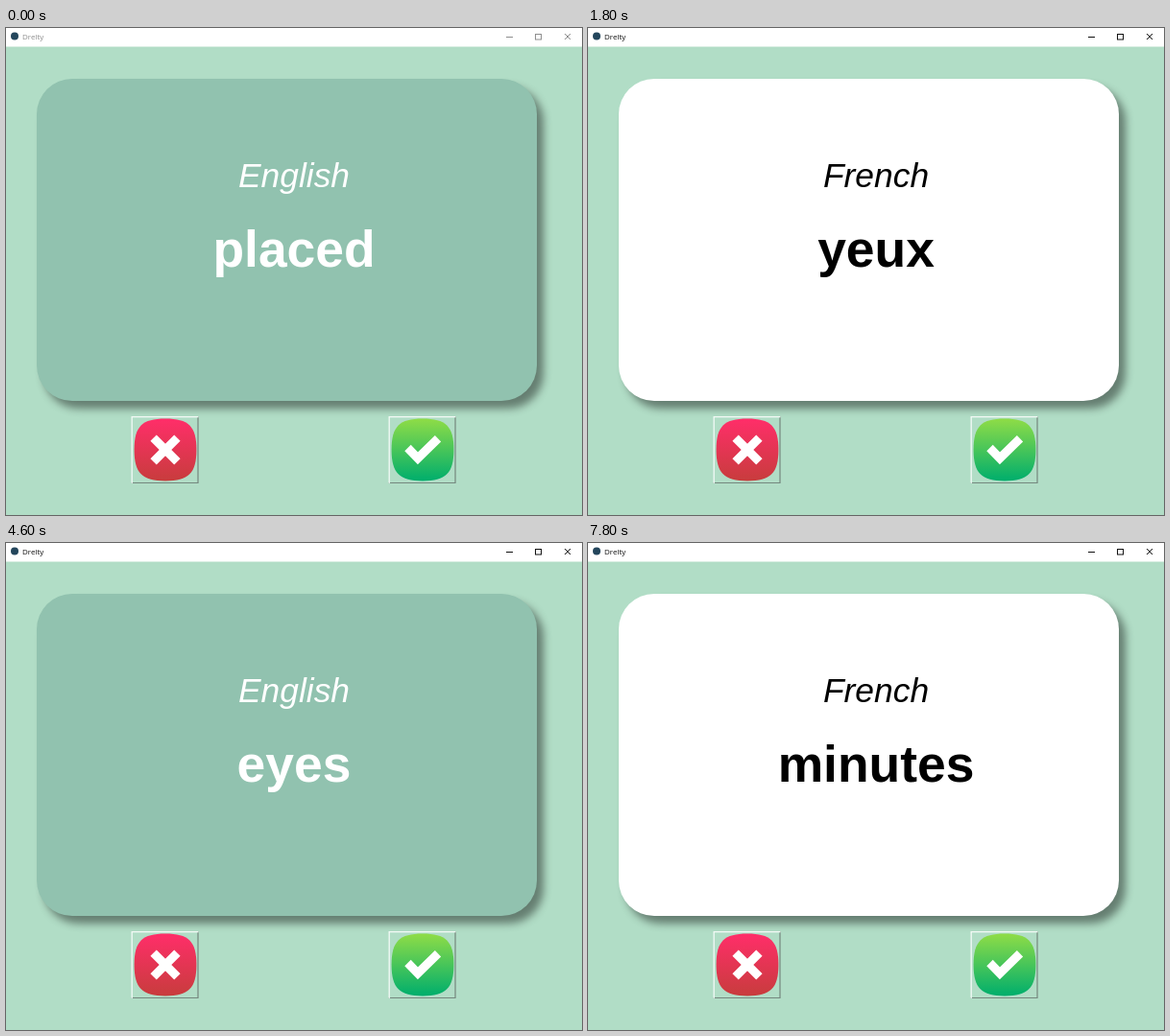
Animation, 600 px wide and 508 px high, one loop 8000 ms. Source, as an HTML page with a canvas:

```html
<!DOCTYPE html>
<html lang="en">
<head>
<meta charset="utf-8">
<title>Drelty</title>
<style>
  html, body { margin: 0; width: 100%; height: 100%; overflow: hidden; background: #b1ddc6; }
  canvas { display: block; }
</style>
</head>
<body>
<canvas id="stage" width="600" height="508"></canvas>
<script>
const ctx = document.getElementById('stage').getContext('2d');
const LOOP = 8000;
const GREEN = '#b1ddc6';

// Each step holds until the next one starts.
const steps = [
  { at: 0,    lang: 'English', word: 'placed' },
  { at: 1400, lang: 'French',  word: 'yeux',    active: true },
  { at: 4600, lang: 'English', word: 'eyes',    active: true },
  { at: 7000, lang: 'English', word: 'eyes',    active: true, pressed: true },
  { at: 7200, lang: 'French',  word: 'minutes', active: true }
];

function line(points, color, width) {
  ctx.beginPath();
  points.forEach(([x, y]) => ctx.lineTo(x, y));
  ctx.strokeStyle = color;
  ctx.lineWidth = width;
  ctx.stroke();
}

function text(str, x, y, font, color, align) {
  ctx.font = font;
  ctx.fillStyle = color;
  ctx.textAlign = align;
  ctx.fillText(str, x, y);
}

function titleBar(active) {
  const ink = active ? '#111' : '#8e8e8e';
  ctx.fillStyle = '#fff';
  ctx.fillRect(0, 0, 600, 19.5);
  ctx.fillStyle = '#24465c';
  ctx.beginPath();
  ctx.arc(9, 8.5, 4, 0, Math.PI * 2);
  ctx.fill();
  text('Drelty', 17, 12, '8px "Open Sans", sans-serif', ink, 'left');
  line([[521, 9.5], [528, 9.5]], ink, 1);
  ctx.strokeRect(551.5, 6.5, 6, 5.5);
  line([[582, 6], [588, 12]], ink, 1);
  line([[588, 6], [582, 12]], ink, 1);
}

function card(step) {
  const french = step.lang === 'French';
  const ink = french ? '#000' : '#fff';
  ctx.save();
  ctx.shadowColor = 'rgba(0, 0, 0, 0.43)';
  ctx.shadowBlur = 9;
  ctx.shadowOffsetX = 7;
  ctx.shadowOffsetY = 8;
  ctx.fillStyle = french ? '#fff' : '#91c2af';
  ctx.beginPath();
  ctx.roundRect(32, 53, 521, 336, 37);
  ctx.fill();
  ctx.restore();
  text(step.lang, 300, 166, 'italic 35.4px "Liberation Sans", Arial, sans-serif', ink, 'center');
  text(step.word, 300, 249, 'bold 53.4px "Liberation Sans", Arial, sans-serif', ink, 'center');
}

function squircle(cx, cy, r) {
  const k = r * 0.75, c = r * 0.94;
  ctx.beginPath();
  ctx.moveTo(cx - r, cy);
  ctx.bezierCurveTo(cx - r, cy - k, cx - k, cy - r, cx, cy - r);
  ctx.bezierCurveTo(cx + k, cy - r, cx + r, cy - k, cx + r, cy);
  ctx.bezierCurveTo(cx + r, cy + k, cx + k, cy + r, cx, cy + r);
  ctx.bezierCurveTo(cx - k, cy + r, cx - r, cy + k, cx - r, cy);
  ctx.fill();
}

function button(x, colors, marks, pressed) {
  const y = 405, w = 70, h = 70;
  const light = '#f3faf6', dark = '#74877e';
  ctx.fillStyle = GREEN;
  ctx.fillRect(x, y, w, h);
  line([[x + w - 0.5, y], [x + w - 0.5, y + h - 0.5], [x, y + h - 0.5]], pressed ? light : dark, 1.2);
  line([[x + 0.7, y + h], [x + 0.7, y + 0.7], [x + w, y + 0.7]], pressed ? dark : light, 1.3);

  ctx.save();
  ctx.translate(x + 35.5 + (pressed ? 1 : 0), y + 35 + (pressed ? 0.7 : 0));
  const fill = ctx.createLinearGradient(0, -32, 0, 32);
  fill.addColorStop(0, colors[0]);
  fill.addColorStop(1, colors[1]);
  ctx.fillStyle = fill;
  squircle(0, 0, 32.4);
  marks.forEach(m => line(m, '#fff', 9));
  ctx.restore();
}

const cross = [[[-12.4, -12.4], [12.4, 12.4]], [[12.4, -12.4], [-12.4, 12.4]]];
const check = [[[-15.5, -2], [-5, 8.8], [16, -11.7]]];

function draw(t) {
  const step = steps.filter(s => s.at <= t).pop();
  ctx.fillStyle = GREEN;
  ctx.fillRect(0, 0, 600, 508);
  titleBar(step.active);
  card(step);
  button(130.5, ['#ff2e69', '#c83c3d'], cross, step.pressed);
  button(398.5, ['#8edc47', '#00ae6c'], check, false);
}

const start = performance.now();
function tick() {
  draw((performance.now() - start) % LOOP);
  requestAnimationFrame(tick);
}
tick();
</script>
</body>
</html>
```
